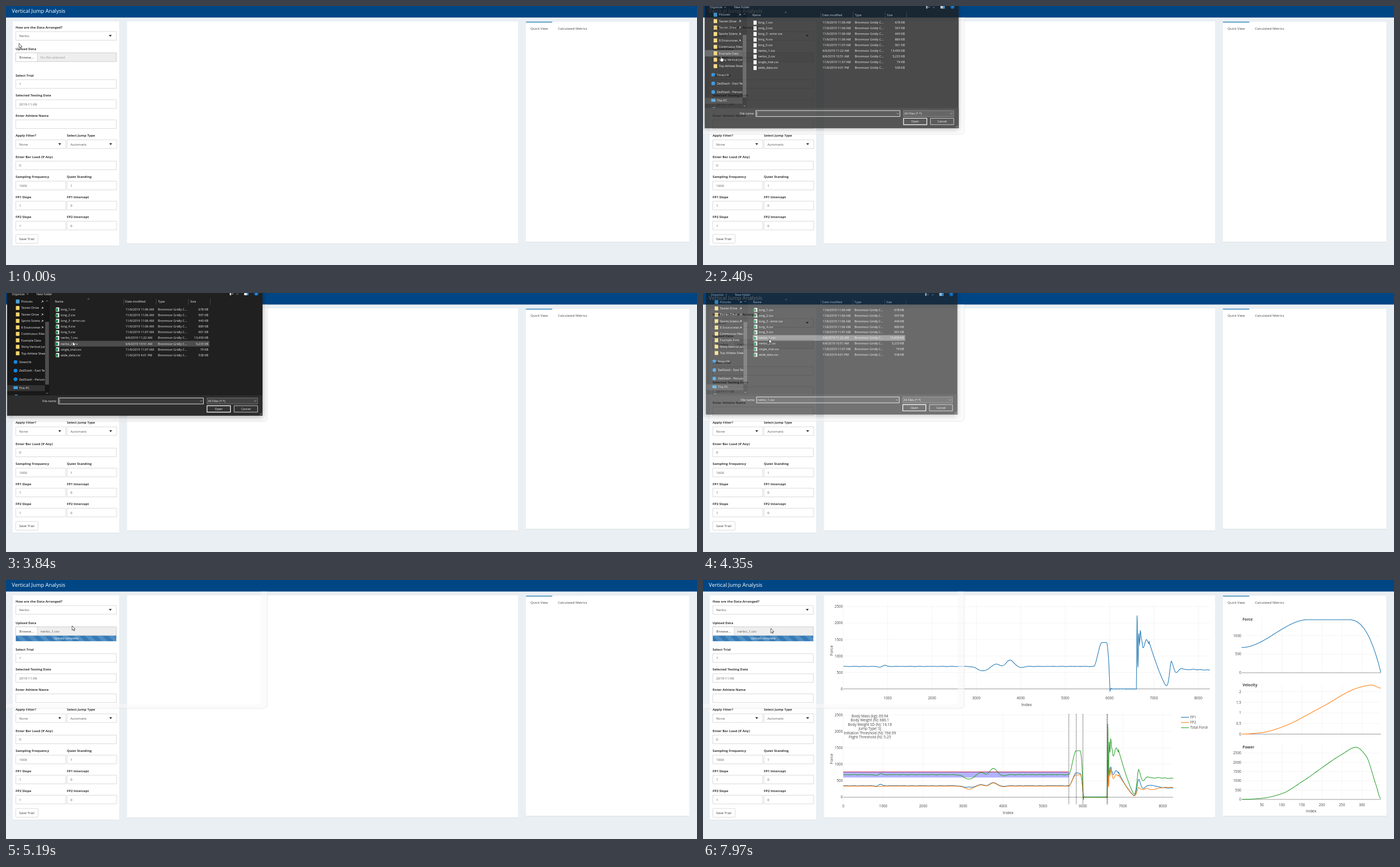
Write an HTML page with a canvas that moves like this. It is 1223x458 px and loops after 8000 ms.

```html
<!DOCTYPE html>
<html lang="en">
<head>
<meta charset="utf-8">
<title>Vertical Jump Analysis</title>
<style>
  html, body { margin: 0; width: 100%; height: 100%; overflow: hidden; background: #eaeff3; }
  canvas { display: block; }
</style>
</head>
<body>
<canvas id="stage" width="1223" height="458"></canvas>
<script>
const LOOP = 8000;
const BLUE = '#1f77b4', ORANGE = '#ff7f0e', GREEN = '#2ca02c';
const screen2d = document.getElementById('stage').getContext('2d');
const layer2d = new OffscreenCanvas(1223, 458).getContext('2d');
let ctx = screen2d;

const clamp = v => Math.max(0, Math.min(1, v));
const progress = (t, start, length) => clamp((t - start) / length);
const smooth = u => u * u * (3 - 2 * u);

// ---------- drawing helpers ----------
function fill(x, y, w, h, color) {
  ctx.fillStyle = color;
  ctx.fillRect(x, y, w, h);
}
function box(x, y, w, h, background, border, radius = 0, width = 0.7) {
  ctx.beginPath();
  ctx.roundRect(x, y, w, h, radius);
  ctx.fillStyle = background;
  ctx.fill();
  ctx.lineWidth = width;
  ctx.strokeStyle = border;
  ctx.stroke();
}
function line(points, color, width = 1) {
  ctx.beginPath();
  points.forEach(([x, y]) => ctx.lineTo(x, y));
  ctx.strokeStyle = color;
  ctx.lineWidth = width;
  ctx.stroke();
}
function shape(points, color) {
  ctx.beginPath();
  points.forEach(([x, y]) => ctx.lineTo(x, y));
  ctx.fillStyle = color;
  ctx.fill();
}
function disc(x, y, r, color) {
  ctx.beginPath();
  ctx.arc(x, y, r, 0, 2 * Math.PI);
  ctx.fillStyle = color;
  ctx.fill();
}
// y is the middle of the capital letters
function text(s, x, y, size = 6.05, color = '#333', align = 'left', weight = 400) {
  ctx.font = `${weight} ${size}px "Open Sans", sans-serif`;
  ctx.textAlign = align;
  ctx.fillStyle = color;
  ctx.fillText(s, x, y + size * 0.36);
}
function clipped(x, y, w, h, draw) {
  ctx.save();
  ctx.beginPath();
  ctx.rect(x, y, w, h);
  ctx.clip();
  draw();
  ctx.restore();
}

// ---------- page ----------
function field(label, x, y, w, value) {
  text(label, x, y, 5.9, '#333', 'left', 700);
  box(x + 0.3, y + 7.5, w, 15.3, '#fff', '#ccc');
  text(value, x + 6.3, y + 15.5, 6.05, '#555');
}
function select(label, x, y, w, value) {
  field(label, x, y, w, value);
  const a = x + w - 13;
  shape([[a, y + 13.5], [a + 5.2, y + 13.5], [a + 2.6, y + 16.5]], '#222');
}
function panel(x, y, w, h) {
  fill(x, y + h, w, 0.8, '#d8dcdf');
  fill(x, y, w, h, '#fff');
}
function drawPage(t) {
  fill(0, 0, 1223, 458, '#eaeff3');
  fill(0, 0, 1223, 20.4, '#004685');
  text('Vertical Jump Analysis', 10.3, 8.7, 9.34, '#fff');
  panel(12, 27.3, 188.3, 396.5);
  panel(214.3, 27.3, 692, 392.7);
  panel(920.3, 28, 289, 389);
  fill(920.3, 27.7, 46.5, 1.6, '#3c8dbc');
  text('Quick View', 928.3, 39.7, 6.05, '#444');
  text('Calculated Metrics', 977, 39.7, 6.05, '#444');

  select('How are the Data Arranged?', 17, 37.7, 178, 'Nerbo');
  field('Upload Data', 17, 75.4, 178, '');
  const loaded = t >= 4250, hovered = t > 1170 && t < 2850;
  box(17.3, 82.9, 178, 15.3, '#eee', '#ccc');
  box(17.3, 82.9, 38, 15.3, hovered ? '#e2e2e2' : '#fff', '#ccc');
  text('Browse...', 23.5, 90.9);
  text(loaded ? 'nerbo_1.csv' : 'No file selected', 61, 90.9, 6.05, loaded ? '#555' : '#999');

  field('Select Trial', 17, 122.8, 178, '1');
  field('Selected Testing Date', 17, 158.3, 178, '2019-11-06');
  field('Enter Athlete Name', 17, 193.8, 178, '');
  select('Apply Filter?', 17, 229.2, 88.5, 'None');
  select('Select Jump Type', 107.7, 229.2, 88, 'Automatic');
  field('Enter Bar Load (If Any)', 17, 266.8, 178, '0');
  [['Sampling Frequency', 1000, 'Quiet Standing', 1],
   ['FP1 Slope', 1, 'FP1 Intercept', 0],
   ['FP2 Slope', 1, 'FP2 Intercept', 0]].forEach(([a, aValue, b, bValue], i) => {
    field(a, 17, 302.3 + i * 35.4, 88.5, aValue);
    field(b, 107.7, 302.3 + i * 35.4, 88, bValue);
  });
  box(17.3, 404, 39.5, 15.5, '#fff', '#ccc', 1.5);
  text('Save Trial', 23.3, 412);
}
function drawUpload(t) {
  const width = 178 * progress(t, 4800, 390);
  clipped(17.3, 98.6, width, 9.6, () => {
    fill(17, 98, 180, 11, '#337ab7');
    for (let x = 17.3; x < 200; x += 20.4)
      shape([[x, 98.4], [x + 10.2, 98.4], [x + 20.4, 108.6], [x + 10.2, 108.6]], 'rgba(255,255,255,.15)');
    text('Upload complete', 17.3 + width / 2, 103.5, 5.5, '#fff', 'center');
  });
}

// ---------- jump data ----------
const bump = (x, centre, width, height) => height * Math.exp(-(((x - centre) / width) ** 2));
const ring = (x, period, decay) => Math.exp(-Math.abs(x) / decay) * Math.cos(2 * Math.PI * x / period);

function standing(x) {
  return 684 + 6 * Math.sin(x / 33) * Math.sin(x / 210) + bump(x, 930, 50, 35) - bump(x, 810, 50, 28)
    - bump(x, 3150, 170, 135) + bump(x, 3430, 110, 75) + bump(x, 3760, 110, 195) - bump(x, 4010, 80, 35);
}
function totalForce(x) {
  if (x < 5640) return standing(x);
  if (x < 5930) return 684 + 726 * smooth(progress(x, 5640, 190));
  if (x < 6010) return 1410 - 1470 * progress(x, 5930, 80) ** 2;
  if (x < 6606) return -60 * ring(x - 6010, 70, 25);
  if (x < 6621) return 2390 * (x - 6606) / 15;
  if (x < 6890) return 1410 + 1150 * ring(x - 6621, 38, 30) + 270 * ring(x - 6698, 138, 120);
  if (x < 7275) return 100 + 1335 * (1 - progress(x, 6890, 385)) ** 1.25;
  if (x < 7395) return 100 + 740 * smooth(progress(x, 7275, 120) ** 1.5);
  return 590 + 250 * ring(x - 7395, 250, 110) - 15 * progress(x, 7900, 300) + 6 * Math.sin(x / 25);
}
// Half of the difference between the two plates.
const imbalance = x => 6 + bump(x, 930, 60, 28) + bump(x, 3150, 80, 28) + bump(x, 5850, 70, 28)
  + bump(x, 6800, 130, 60) + bump(x, 7400, 60, 115) + bump(x, 7720, 150, 60) - 16 * progress(x, 7900, 200);
const plate1 = x => totalForce(x) / 2 + imbalance(x);
const plate2 = x => totalForce(x) / 2 - imbalance(x);

const jumpForce = x => 680 + 750 * smooth(progress(x, 0, 165)) - 1420 * progress(x, 265, 82) ** 2.5;
// Smooth curve through evenly weighted key points, without overshoot.
function curve(points) {
  const grade = i => (points[i + 1][1] - points[i][1]) / (points[i + 1][0] - points[i][0]);
  const slopes = points.map((_, i) => {
    if (!i || i === points.length - 1) return 0;
    const a = grade(i - 1), b = grade(i);
    return a * b > 0 ? 2 * a * b / (a + b) : 0;
  });
  return x => {
    let i = 0;
    while (i < points.length - 2 && x > points[i + 1][0]) i++;
    const [x0, y0] = points[i], [x1, y1] = points[i + 1];
    const h = x1 - x0, u = (x - x0) / h, v = 1 - u;
    return y0 * smooth(v) + y1 * smooth(u) + h * u * v * (slopes[i] * v - slopes[i + 1] * u);
  };
}
const velocity = curve([[0, 0], [50, 0.07], [100, 0.33], [200, 1.28], [290, 2.18], [325, 2.31], [347, 2.17]]);
const power = curve([[0, 0], [50, 60], [100, 310], [150, 950], [250, 2430], [285, 2810], [310, 2350], [335, 780], [347, 60]]);

// ---------- charts ----------
function plot(value, end, step, left, xUnit, zero, yUnit, color) {
  const points = [];
  for (let x = 0; x <= end; x += step) points.push([left + x * xUnit, zero - value(x) * yUnit]);
  line(points, color, 1.05);
}
function axisTitle(s, x, y, angle = 0) {
  ctx.save();
  ctx.translate(x, y);
  ctx.rotate(angle);
  text(s, 0, 0, 7.3, '#444', 'center');
  ctx.restore();
}
function horizontal(value, left, right, y) {
  line([[left, y], [right, y]], value ? '#eee' : '#555', 0.6);
  text(value, left - 1, y, 6.3, '#444', 'right');
}
function forceAxes(zero, top, bottom, right, xUnit, firstTick) {
  for (let x = 0; x <= 8000; x += 1000) {
    const px = 248.3 + x * xUnit;
    line([[px, top], [px, bottom]], '#eee', 0.6);
    if (x >= firstTick) text(x, px, bottom + 6.5, 6.3, '#444', 'center');
  }
  for (let y = 0; y <= 2500; y += 500) horizontal(y, 248.3, right, zero - y * 0.0582);
  axisTitle('Force', 227.5, zero - 68, -Math.PI / 2);
  axisTitle('Index', (248.3 + right) / 2, bottom + 18);
}
function quickPlot(title, top, zero, unit, maxTick, tick, value, color) {
  for (let x = 50; x <= 300; x += 50) {
    const px = 953.6 + x * 0.709;
    line([[px, top - 3], [px, zero]], '#eee', 0.6);
  }
  for (let y = 0; y <= maxTick; y += tick) horizontal(y, 953.6, 1200, zero - y * unit);
  text(title, 955, top, 6.6, '#444', 'left', 700);
  plot(value, 347, 1, 953.6, 0.709, zero, unit, color);
}
function drawCharts() {
  forceAxes(192.6, 41, 202, 897, 0.07854, 1000);
  plot(totalForce, 8260, 5, 248.3, 0.07854, 192.6, 0.0582, BLUE);

  forceAxes(384.1, 236.5, 393.5, 832, 0.0707, 0);
  fill(248.3, 339.4, 399.2, 9.9, 'rgba(0,0,255,.3)');
  [[plate1, BLUE], [plate2, ORANGE], [totalForce, GREEN]].forEach(([value, color]) =>
    plot(value, 8260, 5, 248.3, 0.0707, 384.1, 0.0582, color));
  line([[248.3, 339.4], [647.5, 339.4]], '#b0184c');
  ctx.setLineDash([1.6, 1.3]);
  [647.5, 660.6, 672.4, 715, 716].forEach(x => line([[x, 237], [x, 397]], '#333', 0.9));
  ctx.setLineDash([]);
  ['Body Mass (kg): 69.94', 'Body Weight (N): 686.1', 'Body Weight SD (N): 16.18', 'Jump Type: SJ',
   'Initiation Threshold (N): 766.99', 'Flight Threshold (N): 5.25'].forEach((s, i) =>
    text(s, 295.3, 240.5 + i * 7.5, 6.45, '#444', 'center'));
  [['FP1', BLUE], ['FP2', ORANGE], ['Total Force', GREEN]].forEach(([s, color], i) => {
    const y = 242.8 + i * 9.2;
    line([[846, y], [860, y]], color, 1.1);
    text(s, 862.3, y, 6.2, '#444');
  });

  quickPlot('Force', 70, 164, 0.0656, 1000, 500, jumpForce, BLUE);
  quickPlot('Velocity', 186, 272.5, 37.5, 2, 0.5, velocity, ORANGE);
  quickPlot('Power', 295.3, 388, 0.0328, 2500, 500, power, GREEN);
  for (let x = 50; x <= 300; x += 50) text(x, 953.6 + x * 0.709, 397.7, 6.3, '#444', 'center');
  axisTitle('Index', 1076.5, 408.7);
}

// ---------- file dialog ----------
const files = [
  'long_1.csv|11/6/2019 11:06 AM|678 KB', 'long_2.csv|11/6/2019 11:06 AM|597 KB',
  'long_3 - error.csv|11/6/2019 11:06 AM|440 KB', 'long_4.csv|11/6/2019 11:06 AM|889 KB',
  'long_5.csv|11/6/2019 11:07 AM|901 KB', 'nerbo_1.csv|6/6/2019 11:22 AM|13,459 KB',
  'nerbo_2.csv|6/6/2019 10:51 AM|5,233 KB', 'single_trial.csv|11/6/2019 11:07 AM|79 KB',
  'wide_data.csv|11/6/2019 4:01 PM|538 KB'].map(row => row.split('|'));
const folders = ['Pictures', 'Tavren Drive', 'Tavren Drive', 'Sports Science', 'R Environment', 'Continuous Files',
  'Example Data', 'Shiny Vertical Jump', 'Top Athlete Sheets'];
const places = ['Stowcrib', 'ZedStash - East Tenn', 'ZedStash - Personal', 'This PC'];
const small = (s, x, y, align, color = '#f0f0f0') => text(s, x, y, 5.4, color, align);
const chevron = (x, y, d) => line([[x - 1.7, y - d], [x, y + d], [x + 1.7, y - d]], '#ccc', 0.7);

function drawSidebar(mouse) {
  fill(2, -69, 75, 250, '#191919');
  fill(2, 163, 67, 10.5, '#333');
  if (mouse.x < 70) fill(2, 78, 67, 11.3, '#4d4d4d');
  clipped(2, 0, 67.3, 181, () => {
    folders.forEach((name, i) => {
      const y = 15 + i * 11.45, pinned = i < 5;
      fill(17.5, y - 3.5, 6.3, 7, i ? '#f6d56f' : '#4ba3d8');
      clipped(2, y - 5, pinned ? 59 : 68, 10, () => small(name, 27, y));
      if (!pinned) return;
      line([[62.5, y + 2], [65.5, y - 1]], '#ccc', 0.8);
      line([[63.8, y - 1.5], [66, y + 0.8]], '#ccc', 1.3);
    });
    places.forEach((name, i) => {
      const y = 122 + i * 15.3;
      if (i < 3) disc(16.8, y, 3.3, '#1288de');
      else fill(13.3, y - 3, 7.5, 5, '#3aa0e0');
      small(name, 23.2, y);
    });
    fill(15.5, 179.8, 5, 2, '#3aa0e0');
  });
  fill(69.3, 9, 7, 172, '#171717');
  fill(69.3, 51, 6.7, 111, '#4d4d4d');
  chevron(72.6, 14, -0.9);
  chevron(72.6, 177.3, 0.9);
}
function drawFiles(t, mouse) {
  small('Name', 86.5, 15.3);
  small('Date modified', 211, 15.3);
  small('Type', 269, 15.3);
  small('Size', 326.3, 15.3);
  [208.5, 265.8, 323, 361.5].forEach(x => line([[x, 10], [x, 20.5]], '#555', 0.7));
  chevron(146, 10.7, -0.8);
  const hovered = mouse.x > 86 ? Math.round((mouse.y - 29) / 10.07) : -1;
  files.forEach(([name, date, size], i) => {
    const y = 29.2 + i * 10.07;
    if (i === 5 && t >= 3900) fill(86, y - 5, 274, 10, '#777');
    else if (i === hovered) fill(86, y - 5, 274, 10, '#4d4d4d');
    fill(88.5, y - 3.7, 5.7, 7.4, '#f2f2f2');
    if (t > 2480) fill(87.3, y - 2, 4.8, 4.8, '#1f8f4d');
    small(name, 97, y);
    small(date, 211.5, y);
    small('Bronmoor Gridly C...', 269, y);
    small(size, 358, y, 'right');
  });
}
function drawToolbar() {
  small('Organize', 10.5, 1.8);
  chevron(38, 1.8, 0.8);
  small('New folder', 54, 1.8);
  fill(396, -1, 2.5, 5, '#ddd');
  fill(399.5, 1, 3, 1.2, '#aaa');
  chevron(409.5, 2, 0.8);
  fill(421.5, -2, 7.5, 6, '#eee');
  fill(426, -2, 3, 6, '#3aa0e0');
  disc(443, 1, 3.6, '#0b76d1');
  small('?', 443, 1, 'center', '#fff');
}
function drawFooter(t) {
  fill(2, 181, 452, 36, '#2d2d2d');
  small('File name:', 90, 191, 'right');
  box(92.8, 185.6, 256.7, 10.6, '#383838', '#f0f0f0', 0, 0.9);
  if (t >= 3900) small('nerbo_1.csv', 95, 191);
  else if ((t - 2300) % 1060 < 530) line([[94.8, 187.5], [94.8, 194.5]], '#fff', 0.6);
  chevron(345.5, 191, 0.9);
  box(355.8, 185.6, 89.5, 10.6, '#424242', '#8a8a8a');
  small('All Files (*.*)', 357.5, 191);
  chevron(441, 191, 0.9);
  box(355.8, 199.3, 41.5, 11.4, '#333', '#fff', 0, 1.2);
  small('Open', 376.5, 205.2, 'center');
  box(403.8, 199.3, 41.5, 11.4, '#333', '#d0d0d0', 0, 0.9);
  small('Cancel', 424.5, 205.2, 'center');
  line([[449, 216], [453, 212]], '#aaa', 0.7);
  line([[451, 216], [453, 214]], '#aaa', 0.7);
}
function drawWindow(t, mouse, scale) {
  ctx.clearRect(0, 0, 1223, 458);
  ctx.save();
  ctx.translate(218, 74);
  ctx.scale(scale, scale);
  ctx.translate(-218, -74);
  ctx.shadowColor = 'rgba(0,0,0,.35)';
  ctx.shadowBlur = 9;
  ctx.shadowOffsetY = 2;
  fill(2, -69, 452, 286, '#202020');
  ctx.shadowColor = 'transparent';
  drawSidebar(mouse);
  drawFiles(t, mouse);
  drawToolbar();
  drawFooter(t);
  ctx.restore();
}
// The window is drawn on its own layer so that it fades as a whole.
function drawDialog(t, mouse) {
  const hidden = (1 - progress(t, 2300, 180)) ** 2, close = progress(t, 4290, 180);
  const alpha = (1 - hidden) * (1 - close);
  if (!alpha) return;
  ctx = layer2d;
  drawWindow(t, mouse, 1 - 0.033 * hidden - 0.047 * close);
  ctx = screen2d;
  ctx.globalAlpha = alpha;
  ctx.drawImage(layer2d.canvas, 0, 0);
  ctx.globalAlpha = 1;
}
// Faint rim that the window's shadow leaves on the page.
function drawRim() {
  ctx.beginPath();
  ctx.roundRect(-20, -20, 483, 247.5, 7);
  ctx.roundRect(-20, -20, 471, 239.5, 6);
  ctx.fillStyle = 'rgba(249,249,249,.6)';
  clipped(0, 20.4, 480, 220, () => {
    ctx.beginPath();
    ctx.roundRect(-20, -20, 483, 247.5, 7);
    ctx.roundRect(-20, -20, 471, 239.5, 6);
    ctx.fill('evenodd');
    ctx.beginPath();
    ctx.roundRect(-20, -20, 482.5, 247, 7);
    ctx.strokeStyle = 'rgba(120,120,120,.08)';
    ctx.lineWidth = 1.5;
    ctx.stroke();
  });
}

// ---------- pointer ----------
function pointerAt(t) {
  if (t >= 7970) return { x: 120, y: 85.5 };
  const toBrowse = smooth(progress(t, 1000, 280));
  const toFiles = smooth(progress(t, 2790, 800));
  const toRow = progress(t, 3840, 100);
  return { x: 23 + 8 * toBrowse + 87 * toFiles - toRow, y: 66 + 22 * toBrowse - 2 * toFiles - 5 * toRow };
}
const HAND = new Path2D('M.3 .8Q1-.2 1.8 .8V4.2L4.8 4.9Q5.8 5.2 5.6 7L4.8 10.5H1L-1.6 7Q-2.2 5.6-1 5.8L.3 6.8Z');
const ARROW = new Path2D('M0 0V8L1.9 6.4L3.1 9L4.3 8.5L3.1 5.9H5.5Z');
function drawPointer(t, { x, y }) {
  const click = t < 1840 ? 0 : 1 - progress(t, 1940, 260);
  disc(x + 1, y + 3.3, 5.2, `rgba(248,236,30,${0.8 * click})`);
  const outline = t > 1170 && t < 2800 ? HAND : ARROW;
  ctx.save();
  ctx.translate(x, y);
  ctx.fillStyle = '#fff';
  ctx.fill(outline);
  ctx.strokeStyle = '#222';
  ctx.lineWidth = 0.7;
  ctx.stroke(outline);
  ctx.restore();
}

function frame(now) {
  const t = now % LOOP, mouse = pointerAt(t);
  drawPage(t);
  drawUpload(t);
  if (t >= 6570) drawCharts();
  if (t >= 2300) drawRim();
  drawDialog(t, mouse);
  drawPointer(t, mouse);
  requestAnimationFrame(frame);
}
requestAnimationFrame(frame);
</script>
</body>
</html>
```
